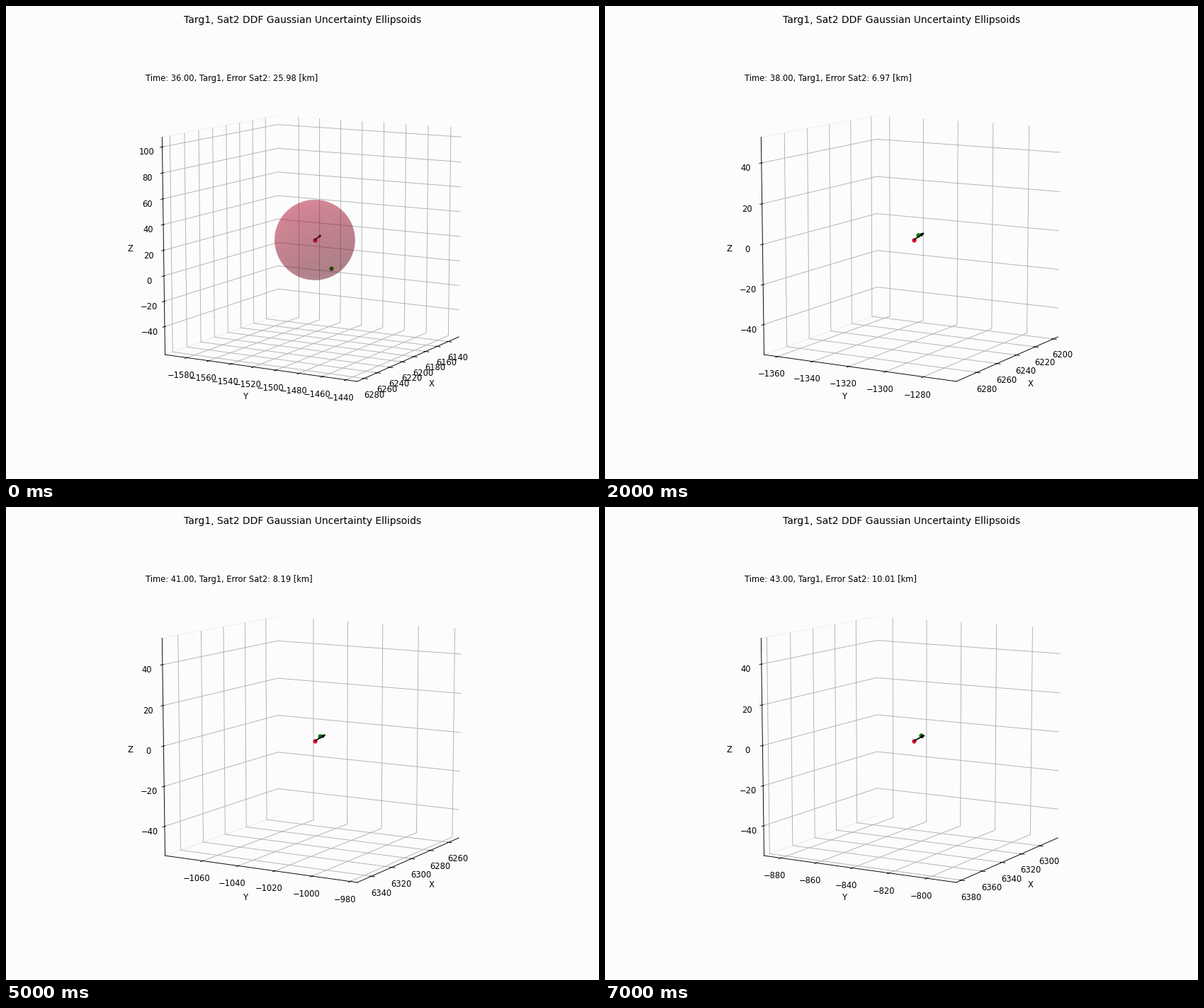
These frames come from a looping animation (837 px wide and 669 px high, 8000 ms). A matplotlib script:

```python
import numpy as np
import matplotlib.pyplot as plt
from matplotlib.animation import FuncAnimation

W, H, DPI = 837, 669, 83
BG = "#fcfcfc"
ELEV, AZIM = 10, 30
STEPS, START = 8, 36
PAD = 50     # km kept free around the ellipsoid
TICK = 20

# Key steps of the track: estimate (x, y, z), then the truth's place
# relative to it as seen on screen (right, up), all in km.
KEYS = [0, 1, 2, 4, 7]
TRACK = np.array([
    (6205.6, -1515.5, 22.6, 12.7, -22.1),
    (6223.1, -1409.9, -0.3, 0.4, 0.75),
    (6247.2, -1315.3, -1.3, 2.15, 2.4),
    (6285.2, -1124.7, -0.8, 2.15, 2.2),
    (6332.3, -837.2, -1.2, 3.3, 2.6),
])
ERROR_KEYS = [0, 1, 2, 4, 6, 7]
ERRORS = [25.98, 3.44, 6.97, 7.60, 8.78, 10.01]

# First uncertainty radius in km, and the floor it collapses to per axis.
RADIUS, FLOOR = 31.5, np.array([0.35, 0.4, 1.7])

e, a = np.radians([ELEV, AZIM])
RIGHT = np.array([-np.sin(a), np.cos(a), 0])
VIEWER = np.array([np.cos(e) * np.cos(a), np.cos(e) * np.sin(a), np.sin(e)])
UP = np.cross(VIEWER, RIGHT)

fig = plt.figure(figsize=((W + 1e-4) / DPI, (H + 1e-4) / DPI), dpi=DPI,
                 facecolor=BG)
fig.suptitle("Targ1, Sat2 DDF Gaussian Uncertainty Ellipsoids")
ax = fig.add_subplot(projection="3d", computed_zorder=False, facecolor=BG)
ax.view_init(ELEV, AZIM)
ax.set_box_aspect((1, 1, 1))
ax.set(xlabel="X", ylabel="Y", zlabel="Z")
for axis in (ax.xaxis, ax.yaxis, ax.zaxis):
    axis.pane.fill = False
ax.xaxis.pane.set_edgecolor(BG)
label = ax.text2D(0.05, 0.95, "", transform=ax.transAxes)
parts = []


def facing(right, up, depth=0):
    """World vector for a direction given as the viewer sees it."""
    return right * RIGHT + up * UP + depth * VIEWER


def dot(pos, color, order):
    return ax.scatter(*pos, color=color, s=20, depthshade=False, zorder=order)


def ellipsoid(center, radii):
    u = np.linspace(0, 2 * np.pi, 50)
    v = np.linspace(0, np.pi, 50)
    shape = (np.outer(np.cos(u), np.sin(v)), np.outer(np.sin(u), np.sin(v)),
             np.outer(np.ones_like(u), np.cos(v)))
    xyz = [c + r * s for c, r, s in zip(center, radii, shape)]
    return ax.plot_surface(*xyz, color="crimson", alpha=0.3, zorder=8)


def set_range(center, reach):
    for name, c, r in zip("xyz", center, reach):
        first = np.ceil((c - r) / TICK) * TICK
        margin = r * 25 / 24
        ax.set(**{f"{name}ticks": np.arange(first, c + r, TICK),
                  f"{name}lim": (c - margin, c + margin)})


def update(k):
    while parts:
        parts.pop().remove()
    error = np.interp(k, ERROR_KEYS, ERRORS)
    label.set_text(f"Time: {START + k:.2f}, Targ1, "
                   f"Error Sat2: {error:.2f} [km]")

    x, y, z, right, up = (np.interp(k, KEYS, col) for col in TRACK.T)
    center = np.array([x, y, z])
    radii = np.maximum(RADIUS * 0.001 ** k, FLOOR)
    velocity = facing(4.6 + 0.06 * k, 3.6 - 0.12 * k, 5)

    parts.append(dot(center + facing(right, up), "green", 5))
    parts.append(dot(center, "crimson", 6))
    parts.append(ax.quiver(*center, *velocity, color="black", zorder=7))
    if radii.min() > 1:
        parts.append(ellipsoid(center, radii))
    set_range(center, PAD + radii)
    return parts


anim = FuncAnimation(fig, update, frames=STEPS, interval=1000,
                     init_func=lambda: [], repeat=True, repeat_delay=0)
plt.show()
```
